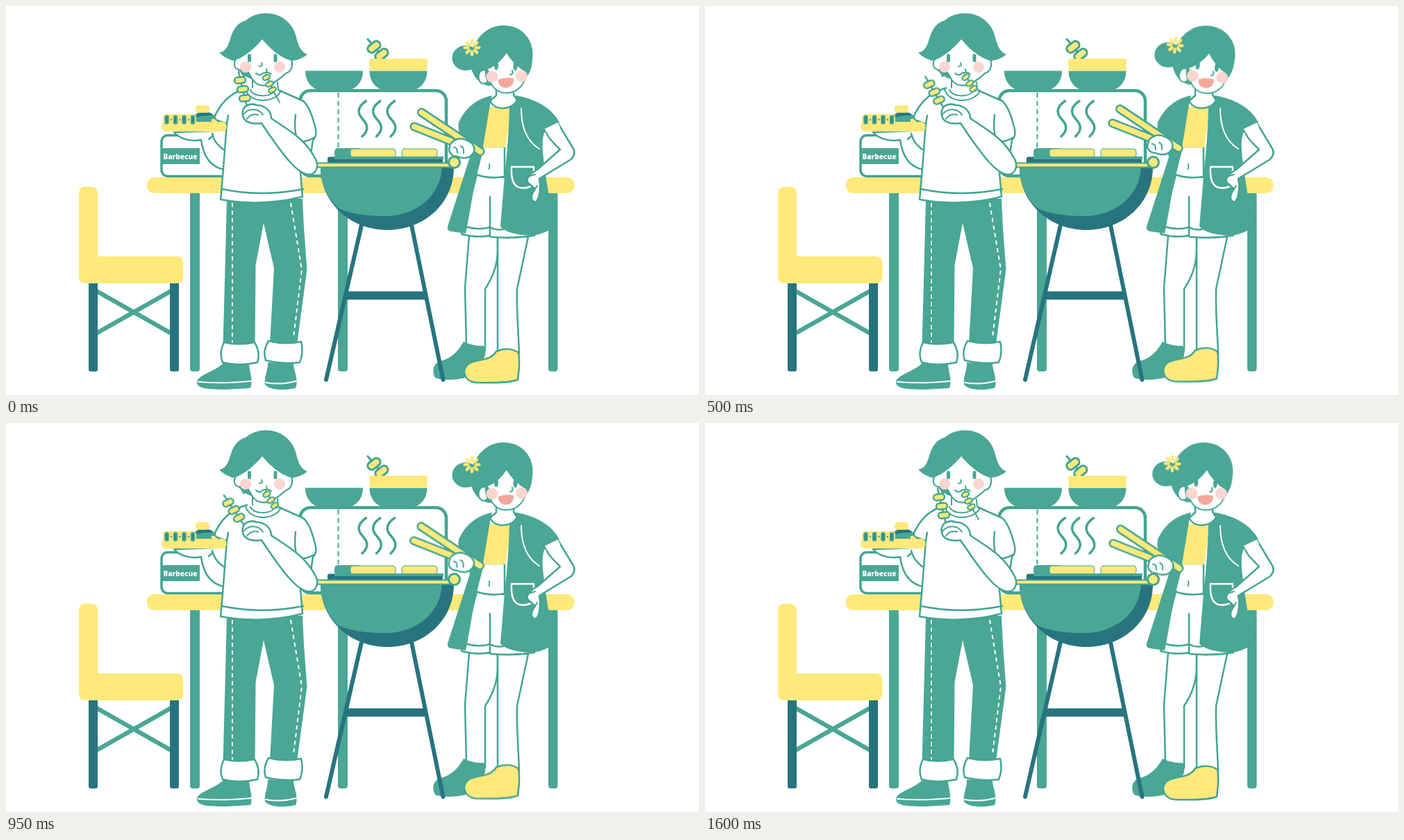
An HTML page that plays this animation: 998x561 px, repeating every 1.65 s.

```html
<!DOCTYPE html>
<html lang="en">
<head>
<meta charset="utf-8">
<title>Barbecue</title>
<style>
  html, body { margin: 0; width: 100%; height: 100%; overflow: hidden; background: #fff; }
  svg { display: block; width: 100vw; height: 100vh; }

  .g { fill: #4aa695; }
  .y { fill: #ffe97a; }
  .d { fill: #27747f; }
  .w { fill: #fff; }
  .blush { fill: #fad6d0; }
  .mouth { fill: #f3a79a; }
  .o { stroke: #42a592; stroke-width: 2.5; stroke-linecap: round; stroke-linejoin: round; }
  .l { fill: none; }
  .wl { fill: none; stroke: #fff; stroke-width: 2; stroke-linecap: round; stroke-linejoin: round; }
  .dash { stroke-dasharray: 6 5; stroke-linecap: butt; }
  .dl { fill: none; stroke: #27747f; stroke-linecap: round; }
  .label { font: 800 10.1px "Open Sans", "Noto Sans", sans-serif; fill: #fff; }

  .move { animation: 1650ms linear infinite; }
  #skewer { animation-name: swing; transform-origin: 350px 158px; }
  #bite { animation-name: chew; transform-origin: 374px 100px; }
  #tail { animation-name: tail; animation-timing-function: step-end; }
  #head { animation-name: nod; transform-origin: 715px 127px; }
  #tongs { animation-name: lift; animation-duration: 825ms; }
  #foot { animation-name: tap; animation-timing-function: ease-in-out; }

  @keyframes swing {
    0%, 97%, 100% { transform: rotate(0deg); }
    47% { transform: rotate(-26deg); }
  }
  @keyframes chew {
    0%, 82%, 100% { transform: rotate(0deg); }
    18%, 30% { transform: rotate(-9deg); }
    42% { transform: rotate(-4deg); }
    57% { transform: rotate(-10deg); }
  }
  @keyframes tail {
    0%, 70% { opacity: 1; }
    9% { opacity: 0; }
  }
  @keyframes nod {
    0%, 57.6%, 81.8% { transform: rotate(0deg); }
    9.1% { transform: rotate(2.5deg); }
    18.2% { transform: rotate(4.4deg); }
    28.8% { transform: rotate(5.2deg); }
    42.4% { transform: rotate(3.9deg); }
    51.5% { transform: rotate(1.7deg); }
    97%, 100% { transform: rotate(1.8deg); }
  }
  @keyframes lift {
    0%, 100% { transform: translate(0, 0); }
    15% { transform: translate(-.5px, -4.3px); }
    36%, 61% { transform: translate(-1px, -5px); }
    85% { transform: translate(0, -1px); }
  }
  @keyframes tap {
    0%, 82%, 100% { transform: translateY(0); }
    30%, 58% { transform: translateY(-1.6px); }
  }
</style>
</head>
<body>
<svg viewBox="0 0 998 561" preserveAspectRatio="none">
  <defs>
    <rect id="bead" class="y o" x="-8" y="-4.5" width="16" height="9" rx="4.5"/>
    <rect id="bit" class="y o" x="-5.5" y="-3.2" width="11" height="6.4" rx="3.2" style="stroke-width:2"/>
    <path id="steam" class="l o" d="M518.500 137C504 147 507 156 513.500 163C521 171 523 179 513 188" style="stroke-width:3.5"/>
    <rect id="seed" class="d o" x="-2" y="-5.500" width="4" height="11" rx="2"/>
    <ellipse id="petal" class="y" cy="-8" rx="2.3" ry="4.6"/>
  </defs>

  <g id="table">
    <rect class="g" x="265" y="260" width="14" height="267" rx="4"/>
    <rect class="g" x="478" y="260" width="14" height="267" rx="4"/>
    <rect class="g" x="781" y="260" width="13.5" height="267" rx="4"/>
    <rect class="y" x="203" y="247" width="615.5" height="23" rx="10"/>
  </g>

  <g id="chair">
    <path class="l o" d="M132 412L236 471M236 412L132 471" style="stroke-width:6.500;stroke:#4aa695"/>
    <rect class="d" x="119" y="390" width="13" height="137" rx="3"/>
    <rect class="d" x="236" y="390" width="13" height="137" rx="3"/>
    <path class="y" d="M115 260.500H122Q132 260.500 132 270.500V361H245.500Q255.500 361 255.500 371V390Q255.500 400 245.500 400H115Q105 400 105 390V270.500Q105 260.500 115 260.500Z"/>
  </g>

  <g id="boxes">
    <rect class="w o" x="224" y="186.500" width="110" height="59" rx="9" style="stroke-width:3.5"/>
    <rect class="g" x="225" y="205" width="54" height="23"/>
    <text class="label" x="226.500" y="220.500">Barbecue</text>
    <rect class="w o" x="423.500" y="122" width="210.500" height="123" rx="15" style="stroke-width:4.500"/>
    <path class="l o" d="M478.500 125V206" style="stroke-width:2;stroke-dasharray:7 5;stroke-linecap:butt"/>
    <use href="#steam"/><use href="#steam" x="20.500"/><use href="#steam" x="41"/>
  </g>

  <g id="bowls">
    <path class="l o" d="M521 48L545 76" style="stroke-width:3"/>
    <use href="#bead" transform="translate(530 59) rotate(-38) scale(1.25)"/>
    <use href="#bead" transform="translate(541 70) rotate(-38) scale(1.25)"/>
    <path id="bowl" class="g" d="M431 93.500H514C514 110 503 122 488 122H457C442 122 431 110 431 93.500Z"/>
    <use href="#bowl" x="92.500"/>
    <path class="y" d="M525 76H605Q607 76 607 78L606 93.500H524L523 78Q523 76 525 76Z"/>
  </g>

  <g id="woman">
    <path class="w o" d="M667 331L661 406L663 492L690 497V408C702 390 708 370 708 352V332Z"/>
    <path class="w o" d="M708 332V502H739C738 470 735 440 736 408L752 333Z"/>
    <path class="g" d="M659 484Q673 491 688 490C693 500 690 510 680 515L666 535C648 540 627 540 618 536C612 525 616 513 630 511C645 505 652 496 659 484Z"/>
    <g id="foot" class="move">
      <path class="y o" d="M706 498C718 493 730 494 738 500C741 515 738 529 737 539C720 545 692 543 676 543C660 541 655 525 666 516C680 508 697 513 706 498Z"/>
    </g>
    <path class="w o" d="M678 243L656 329Q680 335 696 331L698 333Q730 336 761 331L748 250Z"/>
    <path class="l o" d="M697 275V331M661 318Q680 324 697 319Q706 324 716 322"/>
    <path class="w o" d="M687 203L677 243Q697 250 718 246V203Z"/>
    <path class="l o" d="M696 228Q697 232 695.500 235" style="stroke-width:2"/>
    <path class="y" d="M694 146H728L719 204H687Z"/>
    <path class="g" d="M700 129C678 134 662 146 652 168C650 180 653 187 662 191L668 218L636 318Q635 324 641 325L662 328C668 300 672 268 678 243L687 203L697 142Z"/>
    <path class="g" d="M734 129C764 134 787 148 797 168C794 176 785 180 775 183C770 200 774 217 778 250L789 318Q780 327 760 331C735 331 717 325 712 318L718 245Q724 192 725 146Z"/>
    <path class="w o" d="M706 116V129L697 137C705 152 728 150 736 136L731 128V116Z"/>
    <path class="wl" d="M742 148C742 175 750 195 768 206"/>
    <path class="wl" d="M760 243V232H728C727 250 731 260 740 262Q752 264 760 257" style="stroke-width:2.500"/>
    <path class="w o" d="M777 176C778 190 789 197 798 207L765 236C754 242 748 250 752 255L762 264C756 272 754 281 763 283C770 275 770 258 768 249L814 221Q822 212 816 204L795 169Z"/>
    <path class="w" d="M776 177L795 168L798 175L779 183Z"/>
    <path class="l o" d="M752 246L762 243M762 264L765 259" style="stroke-width:2"/>
  </g>

  <g id="head" class="move">
    <ellipse class="g" cx="662" cy="75" rx="19.500" ry="18"/>
    <path class="g" d="M668 78C672 48 692 28 716 28C744 28 759 49 758.500 70C758 82 757 92 751 101L744 112L695 115C678 112 669 96 668 78Z"/>
    <ellipse class="w o" cx="688" cy="102" rx="7.500" ry="10" style="stroke-width:2"/>
    <path class="w o" d="M721 66C712 80 702 87 692 91L696 106C701 120 710 125.500 721 125.500C738 125 748 112 750 95C738 88 728 79 721 66Z" style="stroke-width:2"/>
    <path class="g" d="M690 90Q695 90 697 98Q696 106 694 111Q689 104 690 90Z"/>
    <circle class="blush" cx="700" cy="102" r="8.500"/>
    <circle class="blush" cx="742.500" cy="101" r="8.500"/>
    <ellipse class="g" cx="706" cy="86" rx="3" ry="6.500"/>
    <ellipse class="g" cx="733.500" cy="87" rx="3" ry="6.500"/>
    <path class="l o" d="M729 93Q731 99 726 99" style="stroke-width:2"/>
    <path class="mouth" d="M709 106Q720 102 731 104.500C732 113 726 118 719.500 118C712 117.500 708 112 709 106Z"/>
    <g transform="translate(671 60)">
      <use href="#petal"/><use href="#petal" transform="rotate(45)"/>
      <use href="#petal" transform="rotate(90)"/><use href="#petal" transform="rotate(135)"/>
      <use href="#petal" transform="rotate(180)"/><use href="#petal" transform="rotate(225)"/>
      <use href="#petal" transform="rotate(270)"/><use href="#petal" transform="rotate(315)"/>
    </g>
  </g>

  <g id="grill">
    <path class="dl" d="M512 316L461 539M584 316L629.500 539" stroke-width="6"/>
    <path class="dl" d="M490 417.500H604" stroke-width="12" style="stroke-linecap:butt"/>
    <rect class="g" x="473" y="205" width="40" height="14" rx="5"/>
    <rect class="y o" x="496" y="206" width="65" height="12" rx="4" style="stroke-width:1"/>
    <rect class="y o" x="570" y="206" width="51" height="12" rx="4" style="stroke-width:1"/>
    <rect class="d" x="463" y="217.500" width="166" height="12" rx="3"/>
    <rect class="g" x="473" y="217" width="157" height="4"/>
    <path class="d" d="M453 232H645C645 285 602 323 549 323C497 323 453 285 453 232Z"/>
    <path class="g" d="M453 232H628C626 275 590 303 545 303C515 303 490 298 477 291C462 275 453 255 453 232Z"/>
    <rect class="y o" x="447" y="226.500" width="196" height="6" rx="2" style="stroke-width:2"/>
    <circle class="y o" cx="645.500" cy="225.500" r="8" style="stroke-width:3"/>
  </g>

  <g id="tongs" class="move">
    <g fill="none" stroke-linecap="round">
      <path d="M588 174L656 201" stroke="#42a592" stroke-width="13"/>
      <path d="M588 174L656 201" stroke="#ffe97a" stroke-width="8"/>
      <path d="M598.500 153.500L683 210" stroke="#42a592" stroke-width="13"/>
      <path d="M598.500 153.500L683 210" stroke="#ffe97a" stroke-width="8"/>
    </g>
    <path class="w o" d="M639 203C640 193 654 189 662 193C672 196 676 204 674 210C670 220 658 221 650 217C642 217 636 211 639 203Z"/>
    <path class="l o" d="M645 204Q650 203 650 212M655 202Q660 204 659 212" style="stroke-width:2"/>
  </g>

  <g id="man">
    <path class="g" d="M318 278H427L429 320L433.500 380L419 488H380L386 378L371 313L359.500 374L358.500 490H312.500L315.500 378Z"/>
    <path class="wl dash" d="M326 284V486M410 284L426 380L414 478"/>
    <path class="g" d="M313 515C300 528 275 532 275 543C276 552 290 553 318 553L352 551C356 540 351 528 350 517Z"/>
    <path class="g" d="M377 514C378 525 371 535 373 546C380 554 398 555 417 551C422 540 414 525 414 516Z"/>
    <path class="wl" d="M277 542Q310 545 353 541M374 543Q395 547 418 541"/>
    <path class="w o" d="M314 485Q335 490 358 485Q367 500 362 514Q335 520 312 514Q306 500 314 485Z"/>
    <path class="w o" d="M378 483Q402 489 425 484Q429 500 423 514Q400 517 374 511Q369 498 378 483Z"/>

    <path class="w o" d="M242 182C250 192 268 196 281 193C284 216 294 232 314 236L320 175L298 180Z"/>
    <path class="l o" d="M297 184Q300 198 313 207M292 192L298 187"/>
    <path class="w o" d="M348 118C325 124 308 140 299 163L318 170C315 205 313 240 309 279Q368 290 427 275L424 240C440 225 440 205 442 193C448 188 447 180 444 170C440 155 435 143 428 137L392 121Z"/>
    <path class="l o" d="M311 264Q368 276 428 264M417 157Q414 178 420 196Q434 196 443 190M318 170L320 158"/>
    <path class="w" d="M351 100H393V120C388 138 352 138 348 118Z"/>
    <path class="l o" d="M355 106V118M391 110L392 121M345 120C350 141 388 141 396 122M352 121C357 132 381 132 387 122" style="stroke-width:2"/>

    <path class="w o" d="M330 78C326 88 332 93 341 92C349 92 350 98 355 106C362 117 376 117 388 109C394 105 400 100 403 97C411 95 414 86 411 77L369 44Z" style="stroke-width:2.200"/>
    <path class="g" d="M332 91L346 92L354 105Q348 104 345 101Q344 103 341 102Q340 96 332 91Z"/>
    <path class="g" d="M307 67C318 66 321 54 324 44C328 32 334 24 345 21C354 13 364 10.500 376 10.500C396 11 413 24 418 45C421 58 425 66 434 70C428 75 418 79 411 79C394 74 380 61 369 48C358 61 342 76 326 79C320 76 312 73 307 67Z"/>
    <circle class="blush" cx="345" cy="88" r="8"/>
    <circle class="blush" cx="394" cy="88" r="8"/>
    <rect class="g" x="348" y="69" width="5" height="12" rx="2.500"/>
    <rect class="g" x="385.500" y="69" width="5" height="12" rx="2.500"/>
    <path class="l o" d="M368 82Q371 87 365 87M360 97Q365 102 370 97Q376 94 382 98M375 91L376 96" style="stroke-width:2"/>

    <g id="bite" class="move">
      <path class="l o" d="M374 98L386 125" style="stroke-width:2"/>
      <path id="tail" class="move l o" d="M386 125L394 139" style="stroke-width:2"/>
      <use href="#bit" transform="translate(375 103) rotate(-24)"/>
      <use href="#bit" transform="translate(379.500 112.500) rotate(-24)"/>
      <use href="#bit" transform="translate(383.500 121) rotate(-24)"/>
    </g>

    <g id="skewer" class="move">
      <path class="l o" d="M335 95L349 154"/>
      <use href="#bead" transform="translate(337 107) rotate(-6)"/>
      <use href="#bead" transform="translate(341 120) rotate(-6)"/>
      <use href="#bead" transform="translate(344 133) rotate(-6)"/>
    </g>
    <path class="w o" d="M341 151C343 142 354 140 361 143C372 143 382 151 382 162C405 178 430 190 446 221C451 231 447 242 437 243C420 243 400 217 368 169C354 171 338 168 341 151Z"/>
    <path class="l o" d="M342 156Q350 147 361 150Q367 152 370 157M347 163Q353 154 363 157" style="stroke-width:2"/>
  </g>

  <g id="tray">
    <rect class="y" x="224" y="167" width="93.500" height="14" rx="6"/>
    <path class="g" d="M266 167Q271 153 283 152Q298 152 303 162L299 167Z"/>
    <path class="d" d="M272 161L278 154H294L298 158Q285 157 272 161Z"/>
    <rect class="y" x="273" y="143" width="20" height="11" rx="4.500"/>
    <path class="y o" d="M295 167Q294 161 300 162L306 167" style="stroke-width:1.500"/>
    <rect class="y" x="226" y="156" width="48" height="16" rx="5"/>
    <use href="#seed" x="231.500" y="164"/><use href="#seed" x="244" y="164"/>
    <use href="#seed" x="256.500" y="164"/><use href="#seed" x="269" y="164"/>
    <path class="l o" d="M237.800 164h.1M250.300 164h.1M262.800 164h.1"/>
  </g>
</svg>
</body>
</html>
```
